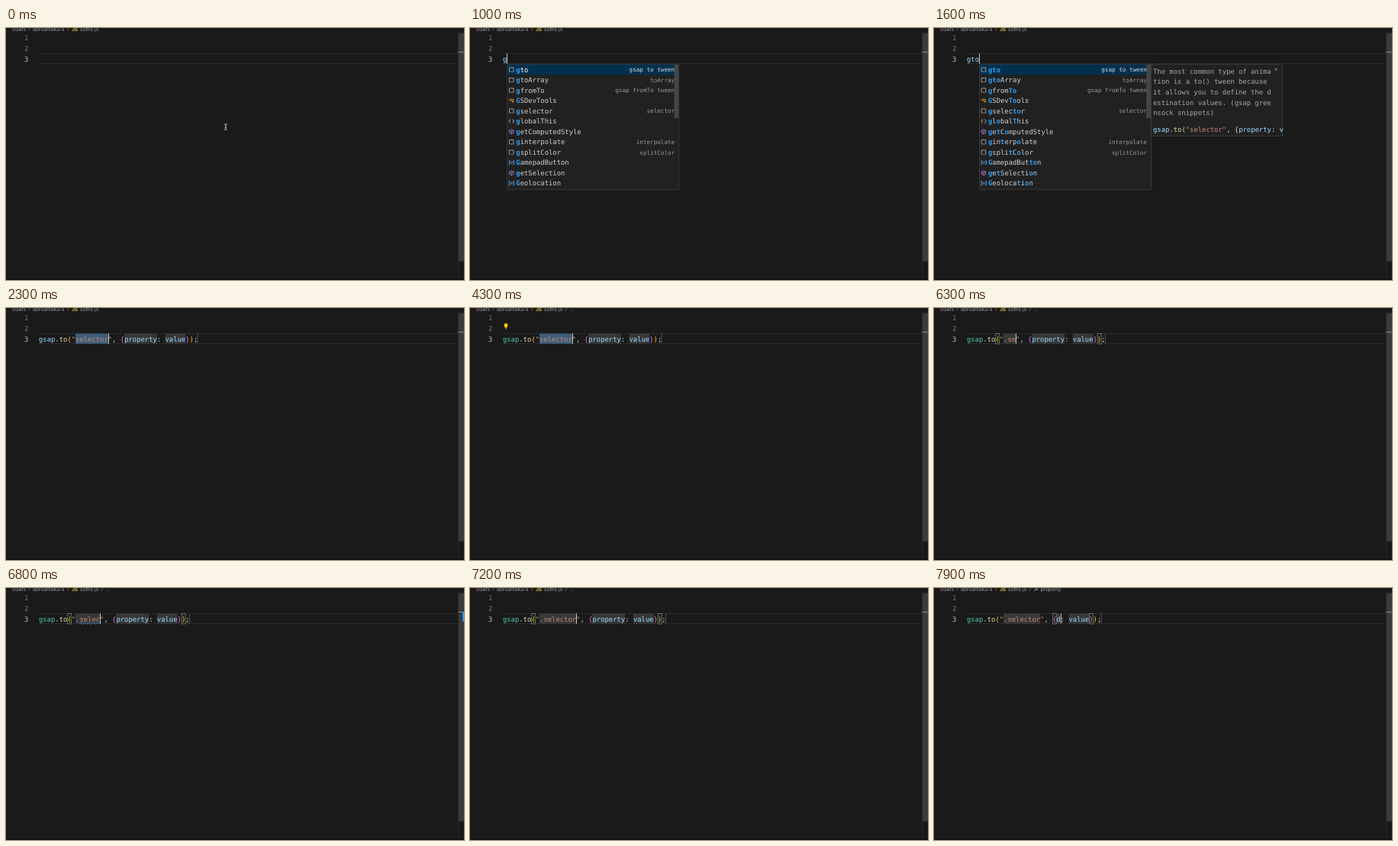
An HTML page for the animation above (8000 ms loop, 600x330 px).

```html
<!DOCTYPE html>
<html lang="en">
<head>
<meta charset="utf-8">
<title>Editor snippet</title>
<style>
html, body { margin: 0; width: 100%; height: 100%; overflow: hidden; background: #1a1a1a; }
svg { display: block; width: 600px; height: 330px; }
text { font: 8.87px "DejaVu Sans Mono", monospace; white-space: pre; text-rendering: geometricPrecision; }
.ui { font: 6.6px Inter, sans-serif; }
.small { font-size: 7.62px; }
.bold { font-weight: bold; }
</style>
</head>
<body>
<svg id="stage" viewBox="0 0 600 330"></svg>
<script>
const LOOP = 8000, LEFT = 43, CHAR = 5.34, ROW = 13.6, BASE = 43.6;
const BLUE = '#9cdcfe', PLAIN = '#d4d4d4', GOLD = '#ffd700', PINK = '#da70d6',
      STRING = '#c68c74', CALL = '#dcdcaa', TEAL = '#4ec9b0';

// [time, typed word] before the snippet, [time, selector, property, stop] after it
const words = [[-700, ''], [600, 'g'], [1400, 'gt'], [1500, 'gto']];
const edits = [[2300, 'selector', 'property', 1]];
[5700, 6000, 6200, 6400, 6600, 6800, 6900, 7100, 7200].forEach((time, i) =>
  edits.push([time, '.selector'.slice(0, i + 1), 'property', 0]));
edits.push([7400, '.selector', 'property', 2], [7900, '.selector', 'd', 3]);

const items = [
  ['gto', 'snippet', 'gsap to tween'], ['gtoArray', 'snippet', 'toArray'],
  ['gfromTo', 'snippet', 'gsap fromTo tween'], ['GSDevTools', 'class'],
  ['gselector', 'snippet', 'selector'], ['globalThis', 'module'],
  ['getComputedStyle', 'method'], ['ginterpolate', 'snippet', 'interpolate'],
  ['gsplitColor', 'snippet', 'splitColor'], ['GamepadButton', 'variable'],
  ['getSelection', 'method'], ['Geolocation', 'variable']
];
const info = ['The most common type of anima', 'tion is a to() tween because',
  'it allows you to define the d', 'estination values. (gsap gree', 'nsock snippets)'];

const line = (d, color, width = 0.8) =>
  `<path d="${d}" fill="none" stroke="${color}" stroke-width="${width}"/>`;
const icons = {
  snippet: line('M.5 6V.6H6V6M.5 6H6', '#b8b8b8') + line('M1.5 6h1M3.8 6h1', '#252526', 1),
  class: line('M.5 2L2 .6 3.3 2 2 3.3ZM3 2.2H5M4 2.2V5H5', '#ee9d28') +
    line('M4.9 2.2h1.5M4.9 5h1.5', '#ee9d28', 1.5),
  module: line('M2 .6Q1 .6 1.1 2T.2 3.3Q1.1 3.4 1.1 4.6T2 6M4.8 .6Q5.8 .6 5.7 2T6.6 3.3Q5.7 3.4 5.7 4.6T4.8 6', '#c0c0c0'),
  method: line('M3.3 .4L6.1 1.8V4.9L3.3 6.3 .5 4.9V1.8ZM.5 1.8L3.3 3.2 6.1 1.8M3.3 3.2V6.3', '#b180d7'),
  variable: line('M1.6 .8H.4V5.8H1.6M5.4 .8H6.6V5.8H5.4M2 3.2L3.6 2.2 5 3.2 3.6 4.5Z', '#75beff')
};

const rect = (x, y, w, h, fill, more = '') =>
  `<rect x="${x}" y="${y}" width="${w}" height="${h}" fill="${fill}" ${more}/>`;
const text = (x, y, s, fill, more = '') => `<text x="${x}" y="${y}" fill="${fill}" ${more}>${s}</text>`;
const ui = (x, s, fill = '#a0a0a0', cls = 'ui') => text(x, 3.7, s, fill, `class="${cls}"`);
const col = n => LEFT + n * CHAR;
const latest = (list, t) => list.filter(e => e[0] <= t).pop();
const group = (x, y, s) => `<g transform="translate(${x} ${y})">${s}</g>`;

function tokens(list, x, y) {
  return list.map(([s, color]) => {
    const out = text(x, y, s, color);
    x += s.length * CHAR;
    return out;
  }).join('');
}

function call(sel, prop, head, paren, brace) {
  return [['gsap', head], ['.', PLAIN], ['to', CALL], ['(', paren], ['"' + sel + '"', STRING],
    [', ', PLAIN], ['{', brace], [prop, BLUE], [': ', PLAIN], ['value', BLUE],
    ['}', brace], [')', paren], [';', PLAIN]];
}

function frame() {
  let s = rect(0, 0, 600, 330, '#1a1a1a') + rect(0, 328, 600, 2, '#141212');
  s += rect(592, 6, 1, 322, '#262626') + rect(593, 6.5, 7, 299, '#3b3b3b') + rect(592, 31, 8, 1, '#858585');
  s += rect(43, 33, 549, 1, '#282828') + rect(43, 46, 549, 1, '#282828');
  for (let i = 0; i < 3; i++)
    s += text(29.4, BASE - (2 - i) * ROW, i + 1, i < 2 ? '#777' : '#c6c6c6', 'text-anchor="end"');
  return s;
}

function crumbs(t) {
  const arrow = x => line(`M${x} -1.6l2.4 2.5l-2.4 2.5`, '#8c8c8c', 0.7);
  let s = ui(8, 'Users') + arrow(29.3) + ui(35, 'dorvanteku-s') + arrow(80) +
    ui(86, 'JS', '#d8c04a', 'ui bold') + ui(97, 'suffix.js');
  if (t >= 2900) s += arrow(124.4);
  if (t >= 7600) s += line('M131 4L134.6 .8M134.2 -.6a1.6 1.6 0 1 0 2.4 1.6', '#b0b0b0', 0.9) + ui(139.5, 'property');
  else if (t >= 2900) s += ui(129.7, '...');
  return s;
}

// Indexes of the letters that the typed word matches
function hits(name, word) {
  const low = name.toLowerCase(), found = new Set([0]), rest = word.slice(1);
  const run = rest ? low.indexOf(rest, 1) : -1;
  let at = 0;
  [...rest].forEach((c, i) => {
    const next = low.indexOf(c, at + 1);
    at = run > 0 ? run + i : next > 0 ? next : low.indexOf(c);
    found.add(at);
  });
  return found;
}

function popup(word, details) {
  const border = 'stroke="#434343" stroke-width=".7"';
  let s = rect(.4, 47.4, 225, 164, '#212122', border) + rect(.8, 47.8, 224.2, 13.4, '#04304f') +
    rect(219.2, 48, 5.6, 70, '#464646');
  items.forEach(([name, icon, note], i) => {
    const y = 57.7 + i * 13.52, found = hits(name, word);
    s += group(2.7, y - 6.4, icons[icon]);
    const spans = [...name].map((c, k) => found.has(k)
      ? `<tspan fill="#2d9ff5" class="bold">${c}</tspan>` : c).join('');
    s += text(12, y, spans, i ? '#d0d0d0' : '#fff');
    if (note) s += text(219.8, y - .3, note, i ? '#9a9a9a' : '#d8d8d8', 'class="small" text-anchor="end"');
  });
  if (!details) return s;
  s += rect(225.4, 47.4, 172, 94.2, '#212122', border);
  info.forEach((row, i) => s += text(228, 59.7 + i * ROW, row, '#a8a8a8'));
  s += line('M387.4 52.5l3.4 3.4m0 -3.4l-3.4 3.4', '#b0b0b0', 0.7);
  const code = call('selector', 'property', BLUE, PLAIN, PLAIN);
  code[9][0] = 'v';
  return s + tokens(code.slice(0, 10), 228, 135.7);
}

function snippet(t) {
  const [, sel, prop, stop] = latest(edits, t);
  const propAt = 13 + sel.length, valueAt = propAt + prop.length + 2, end = valueAt + 8;
  const place = (at, n, active) => rect(col(at), 33.5, n * CHAR, 13.3, active ? '#405c79' : '#373838');
  const box = at => rect(col(at) + .3, 33.6, CHAR - .3, 13.4, '#1a231a', 'stroke="#858585" stroke-width=".7"');
  let s = place(9, sel.length, stop === 1) + place(propAt, prop.length, stop === 2) + place(valueAt, 5);
  if (stop === 0) s += box(7) + box(end - 2);
  if (stop === 3) s += box(propAt - 1) + box(end - 3);
  s += rect(col(end) - .6, 33.5, .9, 13.3, '#565656');
  s += tokens(call(sel, prop, t < 2900 ? BLUE : TEAL, GOLD, PINK), LEFT, BASE);
  if (t >= 6500 && t < 7000) {
    let d = `M${col(10)} 46.4`;
    for (let i = 0; i < (sel.length - 1) * 2; i++) d += `q${CHAR / 4} ${i % 2 ? 2 : -2} ${CHAR / 2} 0`;
    s += line(d, '#3794ff', 0.8) + rect(598, 31, 2, 13, '#3794ff');
  }
  if ((t >= 2600 && t < 5700) || (t >= 7700 && t < 7900))
    s += '<circle cx="47" cy="22.6" r="2.5" fill="#ffc400"/>' + rect(45.8, 24, 2.4, 2, '#ffc400') + rect(46, 26.6, 2, 1, '#e0ad10');
  return [s, stop < 2 ? 9 + sel.length : propAt + prop.length];
}

function scene(t) {
  const word = latest(words, t)[1], done = t >= 2300;
  let s = frame() + crumbs(t), at = word.length;
  if (done) {
    const [code, caret] = snippet(t);
    s += code;
    at = caret;
  } else {
    s += text(LEFT, BASE, word, BLUE);
    if (t >= 1000) s += group(col(at), 0, popup(word, t >= 1100));
  }
  if (t < 600) s += line('M285.8 125.8Q287.8 125.8 287.8 127V132Q287.8 133.3 285.8 133.3M289.8 125.8Q287.8 125.8 287.8 127M287.8 132Q287.8 133.3 289.8 133.3M286.6 130h2.4', '#d0d0d0', 0.9);
  const since = t - latest(words.concat(edits), t)[0];
  if (Math.floor(since / 500) % 2 === 0) s += rect(Math.round(col(at)), 33.5, 1, 13.3, '#c4c5c3');
  return s;
}

const stage = document.getElementById('stage'), start = performance.now();
let shown = '';
function draw() {
  const next = scene((performance.now() - start) % LOOP);
  if (next !== shown) stage.innerHTML = shown = next;
  requestAnimationFrame(draw);
}
draw();
</script>
</body>
</html>
```
